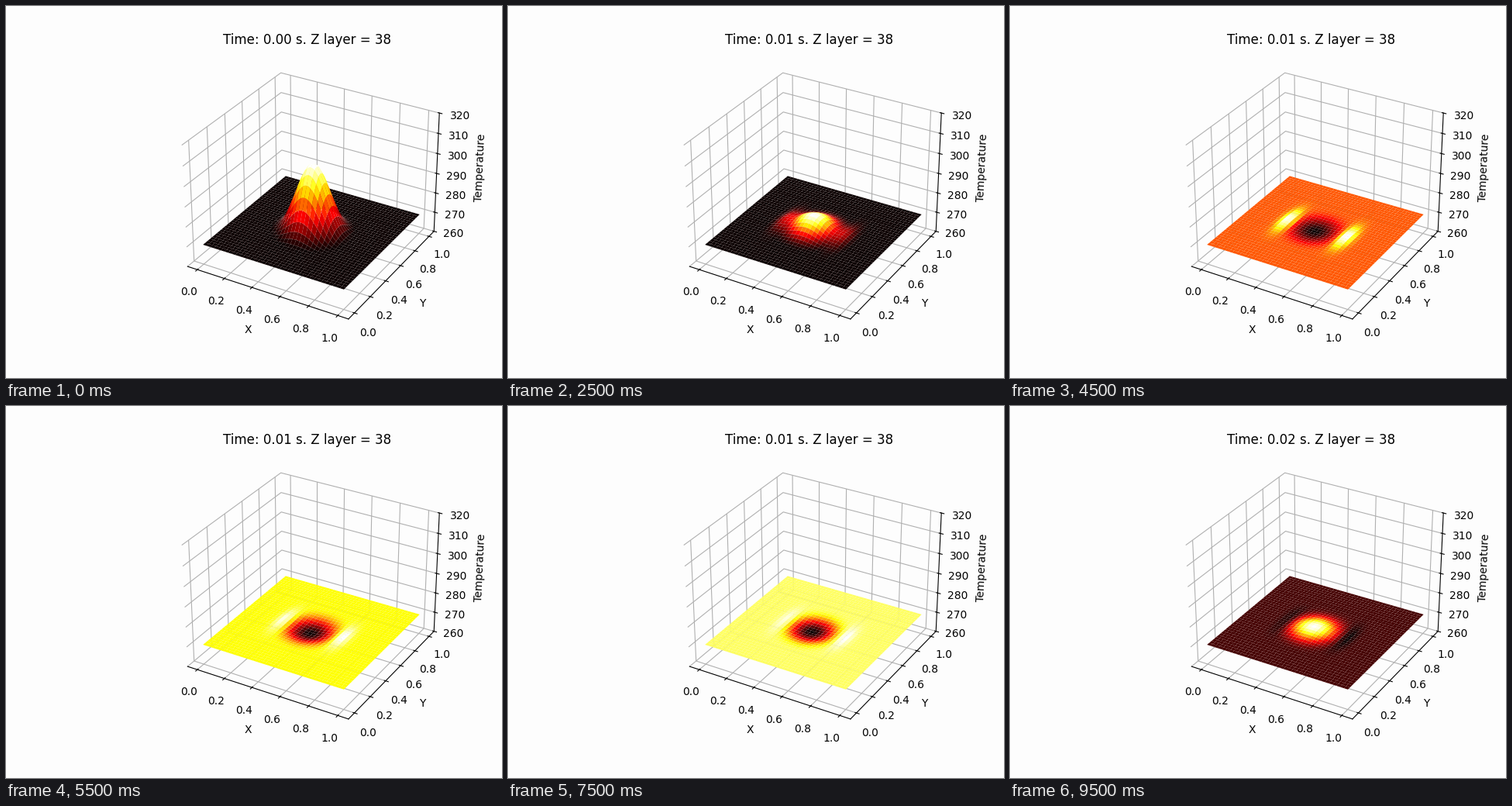
A matplotlib script that plays this animation: 640 px wide and 480 px high, repeating every 10 s.

```python
import numpy as np
import matplotlib.pyplot as plt
from matplotlib.animation import FuncAnimation

FRAMES = 20
INTERVAL = 500
BASE = 270
BACKGROUND = "#fdfdfd"
TURN = 7.8        # frame at which the hump sinks through the base level
HALF_SWING = 8.9  # frames until it comes back up

grid = np.linspace(0, 1, 77)
X, Y = np.meshgrid(grid, grid)
RIDGES = np.exp(-((np.abs(X - .5) - .21) / .045) ** 2
                - ((Y - .5) / .14) ** 2)


def hump_height(frame):
    """Fast collapse to the base level, then a slow shallow swing."""
    if frame < TURN:
        return 33 * (1 - frame / TURN) ** 1.45
    return -2.2 * np.sin(np.pi * (frame - TURN) / HALF_SWING)


def ridge_height(frame):
    """Quick rise, then a steady fall to just below the base level."""
    return .133 * (17.3 - frame) * min(1, frame / 3)


def temperature(frame):
    center = .5 - .013 * min(1, frame / 12)
    r = np.hypot(X - center, Y - center)
    hump = np.cos(np.pi / 2 * np.minimum(r / .29, 1)) ** 3
    return BASE + hump_height(frame) * hump + ridge_height(frame) * RIDGES


fig = plt.figure(figsize=(6.4, 4.8), dpi=100, facecolor=BACKGROUND)
ax = fig.add_axes([.3225, .11, .5775, .77], projection="3d",
                  facecolor=BACKGROUND)
for axis in (ax.xaxis, ax.yaxis, ax.zaxis):
    axis.set_pane_color(BACKGROUND)
ax.set_zlim(260, 320)
ax.set_xlabel("X")
ax.set_ylabel("Y")
ax.set_zlabel("Temperature")
surface = None


def update(frame):
    global surface
    if surface is not None:
        surface.remove()
    surface = ax.plot_surface(X, Y, temperature(frame), cmap="hot")
    ax.set_title(f"Time: {frame * .001:.2f} s. Z layer = 38", x=.4927)
    return surface,


anim = FuncAnimation(fig, update, frames=FRAMES, interval=INTERVAL,
                     init_func=lambda: (), repeat=True, repeat_delay=0)
plt.show()
```
